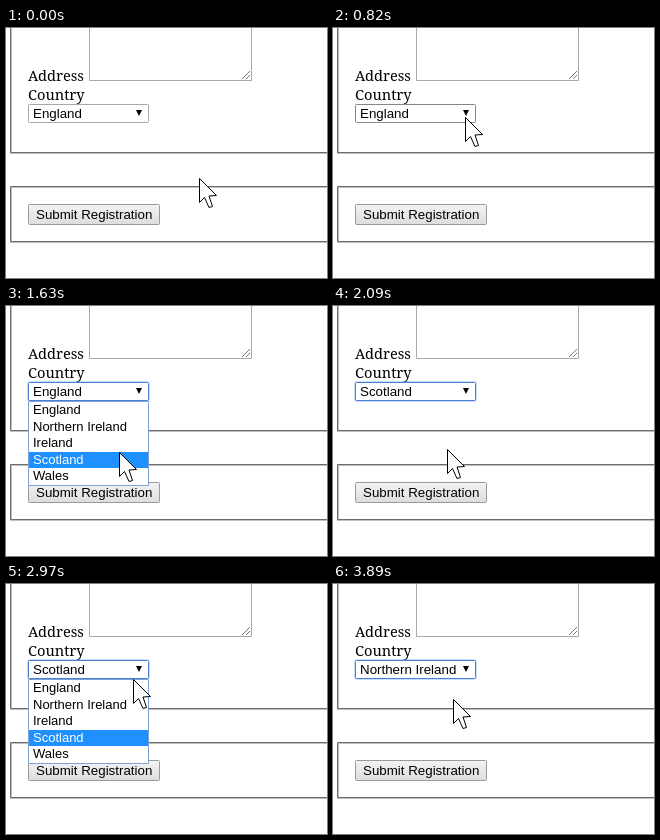
An HTML page with a canvas that plays this animation: 321x250 px, repeating every 3950 ms.

```html
<!DOCTYPE html>
<html lang="en">
<head>
<meta charset="utf-8">
<title>Country select</title>
<style>
  html, body { margin: 0; width: 100%; height: 100%; overflow: hidden; background: #fff; }
  canvas { display: block; }
</style>
</head>
<body>
<canvas id="stage" width="321" height="250"></canvas>
<script>
const ctx = document.getElementById('stage').getContext('2d');
const LOOP = 3950;
const STEP = 75, LEAD = 30; // refresh interval of the pointer, in ms
const SANS = '"Liberation Sans", Arial, sans-serif';
const UI_FONT = `13.333px ${SANS}`;
const MENU_FONT = `13px ${SANS}`;
const LABEL_FONT = '14.65px "Noto Serif", Georgia, serif';
const COUNTRIES = ['England', 'Northern Ireland', 'Ireland', 'Scotland', 'Wales'];
const ROW = 16.5, MENU_TOP = 96;

const REST = { x: 193, y: 150 };
const MOVES = [
  { start: 0, end: 660, x: 132, y: 89 },
  { start: 1200, end: 1650, x: 113, y: 146 },
  { start: 2025, end: 2500, x: 129, y: 89 },
  { start: 2827, end: 3370, x: 120, y: 115 },
];

const ease = u => (1 - Math.cos(Math.PI * Math.min(1, Math.max(0, u)))) / 2;
const rowTop = i => Math.round(MENU_TOP + ROW * i);

function pointerAt(time) {
  const t = Math.floor((time + LEAD) / STEP) * STEP;
  let { x, y } = REST;
  for (const move of MOVES) {
    const k = ease((t - move.start) / (move.end - move.start));
    x += (move.x - x) * k;
    y += (move.y - y) * k;
  }
  return { x: Math.round(x), y: Math.round(y) };
}

function rect(x, y, w, h, color) {
  ctx.fillStyle = color;
  ctx.fillRect(x, y, w, h);
}

function frame(x, y, w, h, color, radius = 0) {
  ctx.beginPath();
  ctx.roundRect(x + 0.5, y + 0.5, w - 1, h - 1, radius);
  ctx.strokeStyle = color;
  ctx.lineWidth = 1;
  ctx.stroke();
}

function text(str, x, y, font = UI_FONT, color = '#000') {
  ctx.font = font;
  ctx.fillStyle = color;
  ctx.fillText(str, x, y);
}

function polygon(points, fill, stroke) {
  ctx.beginPath();
  points.forEach(([x, y]) => ctx.lineTo(x, y));
  ctx.closePath();
  ctx.fillStyle = fill;
  ctx.fill();
  if (stroke) {
    ctx.strokeStyle = stroke;
    ctx.lineWidth = 1;
    ctx.stroke();
  }
}

// Two-tone grooved border running off the right side
function fieldset(top, bottom) {
  frame(4, top, 400, bottom - top - 1, '#6c6c6c');
  rect(5, top + 1, 400, 1, '#c0c0c0');
  rect(5, top + 1, 1, bottom - top - 3, '#c0c0c0');
  rect(4, bottom - 1, 400, 1, '#c0c0c0');
}

function textarea() {
  frame(83, -10, 163, 63, '#a9a9a9');
  ctx.strokeStyle = '#777';
  ctx.lineWidth = 1;
  for (const size of [8, 4]) {
    ctx.beginPath();
    ctx.moveTo(244 - size, 51);
    ctx.lineTo(244, 51 - size);
    ctx.stroke();
  }
}

function button() {
  const shade = ctx.createLinearGradient(0, 176, 0, 197);
  shade.addColorStop(0, '#f4f4f4');
  shade.addColorStop(1, '#dcdcdc');
  rect(23, 177, 130, 19, shade);
  frame(22, 176, 132, 21, '#9a9a9a', 1);
  text('Submit Registration', 30, 191);
}

function select(value, focused, hovered) {
  rect(22, 76, 121, 19, '#fff');
  if (focused) frame(21, 75, 123, 21, 'rgba(77,144,254,0.3)', 2);
  frame(22, 76, 121, 19, focused ? '#4a7fd2' : hovered ? '#868686' : '#a9a9a9', 1);
  text(COUNTRIES[value], 27, 90);
  polygon([[130, 82], [136, 82], [133, 88]], '#000');
}

function menu(active) {
  rect(22, 95, 121, 85, '#fff');
  frame(22, 95, 121, 85, '#7da2d6');
  COUNTRIES.forEach((name, i) => {
    const top = rowTop(i);
    if (i === active) rect(23, top, 119, rowTop(i + 1) - top, '#1e90ff');
    text(name, 27, top + 12, MENU_FONT, i === active ? '#fff' : '#000');
  });
}

function pointer({ x, y }) {
  const shape = [[0, 0], [0, 24], [5, 19], [9.5, 29], [13, 28], [9.5, 17.5], [17, 17]];
  polygon(shape.map(([dx, dy]) => [x + dx + 0.5, y + dy + 0.5]), '#fff', '#000');
}

function draw(t) {
  const tip = pointerAt(t);
  const value = t < 2090 ? 0 : t < 3890 ? 3 : 1;
  const open = (t >= 1040 && t < 2090) || (t >= 2830 && t < 3890);
  const hovered = tip.x < 143 && tip.y < 95;

  rect(0, 0, 321, 250, '#fff');
  fieldset(-10, 126);
  fieldset(158, 215);
  text('Address', 22, 53, LABEL_FONT);
  text('Country', 22, 72, LABEL_FONT);
  textarea();
  button();
  select(value, t >= 960, hovered);
  if (open) menu(tip.y < MENU_TOP ? value : Math.floor((tip.y - MENU_TOP) / ROW));
  pointer(tip);
}

const start = performance.now();
function tick() {
  draw((performance.now() - start) % LOOP);
  requestAnimationFrame(tick);
}
tick();
</script>
</body>
</html>
```
